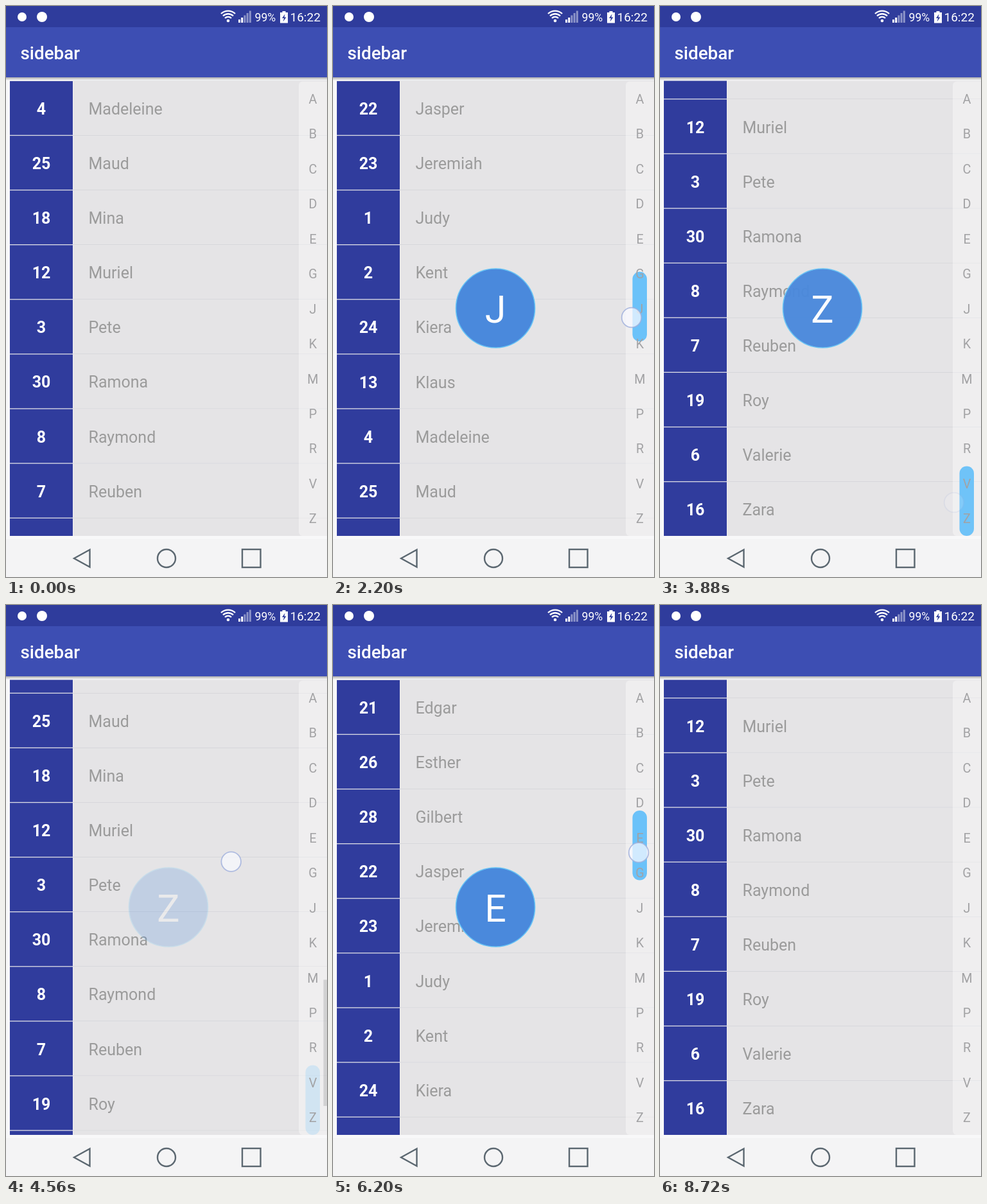
Animation, 500 px wide and 889 px high, one loop 8.76 s. Source, as an HTML page:

```html
<!DOCTYPE html>
<html lang="en">
<head>
<meta charset="utf-8">
<title>sidebar</title>
<style>
  html, body { margin: 0; width: 100%; height: 100%; overflow: hidden; background: #f8f8f9; }
  svg { display: block; width: 100%; height: 100%; font-family: Roboto, sans-serif; }
  .num { font-size: 25px; font-weight: 700; fill: #fff; text-anchor: middle; }
  .name { font-size: 25px; fill: #9b9b9b; }
  .letter { font-size: 19.8px; fill: #a2a2a4; text-anchor: middle; }
  .big { font-size: 59px; fill: #fff; text-anchor: middle; }
  .nav { fill: none; stroke: #5b6770; stroke-width: 2.4; }
</style>
</head>
<body>
<svg viewBox="0 0 500 889" preserveAspectRatio="none">
  <defs>
    <clipPath id="view"><rect x="0" y="116.6" width="500" height="708.4"/></clipPath>
    <linearGradient id="shade" x1="0" y1="0" x2="0" y2="1">
      <stop offset="0" stop-color="#000" stop-opacity=".3"/>
      <stop offset="1" stop-color="#000" stop-opacity="0"/>
    </linearGradient>
  </defs>

  <g clip-path="url(#view)"><g id="list"></g></g>
  <rect id="thumb" x="494.5" width="5.5" height="196.5" fill="#000" fill-opacity=".2"/>
  <path d="M500 117.5H462a6 6 0 0 0-6 6V819a6 6 0 0 0 6 6H500Z" fill="#fff" fill-opacity=".36"/>
  <rect id="pill" x="466.5" width="22.5" height="108.5" rx="11.2" fill="#6bc2f9"/>
  <g id="letters"></g>

  <g id="bubble">
    <circle cx="253" cy="470.5" r="61.5" fill="#4a89dc" stroke="#66c3f5" stroke-width="1.6"/>
    <text id="big" class="big" x="253" y="493"></text>
  </g>

  <rect y="111" width="500" height="5" fill="url(#shade)"/>
  <rect width="500" height="111" fill="#3d4eb3"/>
  <rect width="500" height="33" fill="#2f3c9c"/>
  <text x="22.5" y="83" font-size="27.8" font-weight="500" fill="#fff">sidebar</text>

  <g fill="#fff">
    <circle cx="25" cy="17" r="7"/>
    <circle cx="56" cy="17" r="8"/>
    <circle cx="346" cy="23" r="2.3"/>
    <g fill="none" stroke="#fff" stroke-width="2.4">
      <path d="M341 19a7 7 0 0 1 10 0M338 15.5a11.5 11.5 0 0 1 16 0M335 12a16 16 0 0 1 22 0"/>
    </g>
    <path d="M362 21h3v5h-3zM366.2 18h3v8h-3z"/>
    <path d="M370.4 14.5h3v11.5h-3zM374.6 11h3v15h-3zM378.8 7.5h3v18.5h-3z" opacity=".45"/>
    <text x="387.5" y="24" font-size="17.6">99%</text>
    <path d="M430.5 8h5v2h3.5v16.5h-12V10h3.5z"/>
    <path d="M434.5 12.5l-4.5 6.5h3l-1.5 5.5 5-7h-3z" fill="#2f3c9c"/>
    <text x="442.5" y="24" font-size="19">16:22</text>
  </g>

  <rect y="830" width="500" height="59" fill="#f4f4f5"/>
  <g class="nav">
    <path d="M106 860L130.5 846.5V873.5Z"/>
    <circle cx="250" cy="860" r="14"/>
    <rect x="368" y="846" width="28.5" height="28"/>
  </g>
  <circle id="touch" r="15.3" fill="#f8faff" fill-opacity=".72" stroke="#9fb0dc" stroke-opacity=".8" stroke-width="1.8"/>
</svg>

<script>
const LOOP = 8760, STEP = 40, TOP = 117, VIEW = 708, PITCH = 85.1, ROW = 83.8;
const people = `14 Agatha,11 Alasdair,27 Althea,15 Augustus,10 Axel,20 Ben,17 Burt,29 Clifford,
5 Cora,9 Daphne,21 Edgar,26 Esther,28 Gilbert,22 Jasper,23 Jeremiah,1 Judy,2 Kent,24 Kiera,
13 Klaus,4 Madeleine,25 Maud,18 Mina,12 Muriel,3 Pete,30 Ramona,8 Raymond,7 Reuben,19 Roy,
6 Valerie,16 Zara`.split(',').map(s => s.trim().split(' '));
const letters = [...new Set(people.map(p => p[1][0]))];
const firstRow = letters.map(c => people.findIndex(p => p[1][0] === c));
const CONTENT = (people.length - 1) * PITCH + ROW, MAX = CONTENT - VIEW;
const SLOT = VIEW / letters.length, PILL = 108.5, LAG = 44, FADE = 1230;

// Touch paths as [time, x, y]; the last point is the release.
const first = [[640, 475, 132], [1280, 475, 132], [2200, 465, 485], [3340, 458, 773], [3720, 458, 773]];
const drag = [[4380, 342, 237], [4960, 370, 761], [5000, 371, 785]];
const last = [[5880, 476, 345], [6040, 476, 345], [7320, 477, 668], [7440, 477, 668]];
const touches = [first, drag, last];

const $ = id => document.getElementById(id);
const clamp = (v, lo = 0, hi = 1) => Math.min(hi, Math.max(lo, v));
const mix = (a, b, k) => a + (b - a) * k;
const start = path => path[0][0];
const end = path => path[path.length - 1][0];
const set = (id, attrs) => { for (const k in attrs) $(id).setAttribute(k, attrs[k]); };

$('list').innerHTML = people.map(([num, name], i) => {
  const y = TOP + i * PITCH;
  return `<g transform="translate(0 ${y})">
    <rect x="6" y="${ROW - .2}" width="98.5" height="1.6" fill="#dcdce4"/>
    <rect x="104.5" y="${ROW - .2}" width="396" height="1.6" fill="#d6d6da"/>
    <rect x="6" width="98" height="${ROW}" fill="#303c9d"/>
    <rect x="104.5" width="396" height="${ROW}" fill="#e5e4e6"/>
    <text class="num" x="55" y="52">${num}</text>
    <text class="name" x="128.5" y="52">${name}</text></g>`;
}).join('');
$('letters').innerHTML = letters.map((c, i) =>
  `<text class="letter" x="478" y="${TOP + SLOT * (i + .5) + 7.6}">${c}</text>`).join('');

function at(path, t) {
  const i = path.findIndex(p => p[0] > t);
  if (i < 0) return path[path.length - 1].slice(1);
  if (i === 0) return path[0].slice(1);
  const [a, b] = [path[i - 1], path[i]], k = (t - a[0]) / (b[0] - a[0]);
  return [mix(a[1], b[1], k), mix(a[2], b[2], k)];
}

function barState(path, t) {
  const y = at(path, Math.min(t, end(path)) - LAG)[1];
  const slot = clamp(Math.floor((y - TOP) / SLOT), 0, letters.length - 1);
  return { y, letter: letters[slot], scroll: Math.min(firstRow[slot] * PITCH, MAX) };
}

function scrollAt(t) {
  if (t < start(first)) return 19 * PITCH;
  if (t < start(drag)) return barState(first, t).scroll;
  if (t >= start(last)) return barState(last, t).scroll;
  const moved = at(drag, t)[1] - drag[0][2];
  const k = clamp((t - end(drag)) / 360);
  return MAX - moved - 150 * (1 - (1 - k) ** 2);
}

function draw(t) {
  const scroll = scrollAt(t);
  set('list', { transform: `translate(0 ${-scroll})` });

  const thumb = t < start(drag) ? 0 : 1 - clamp((t - 5640) / 250);
  set('thumb', { y: TOP + scroll / CONTENT * VIEW, opacity: thumb });

  const bar = t < start(last) ? first : last;
  const k = clamp((t - end(bar)) / FADE);
  const shown = t < start(bar) ? 0 : (1 + Math.cos(Math.PI * k)) / 2;
  const { y, letter } = barState(bar, t);
  set('pill', { y: clamp(y - PILL / 2, TOP - .5, TOP + VIEW - PILL), opacity: shown });
  set('bubble', { opacity: shown });
  $('big').textContent = letter;

  const path = touches.filter(p => start(p) <= t).pop();
  const [cx, cy] = path ? at(path, t) : [0, 0];
  set('touch', { cx, cy, opacity: path ? 1 - clamp((t - end(path)) / 200) : 0 });
}

const began = performance.now();
function frame() {
  const t = (performance.now() - began) % LOOP;
  draw(Math.floor(t / STEP) * STEP);
  requestAnimationFrame(frame);
}
frame();
</script>
</body>
</html>
```
